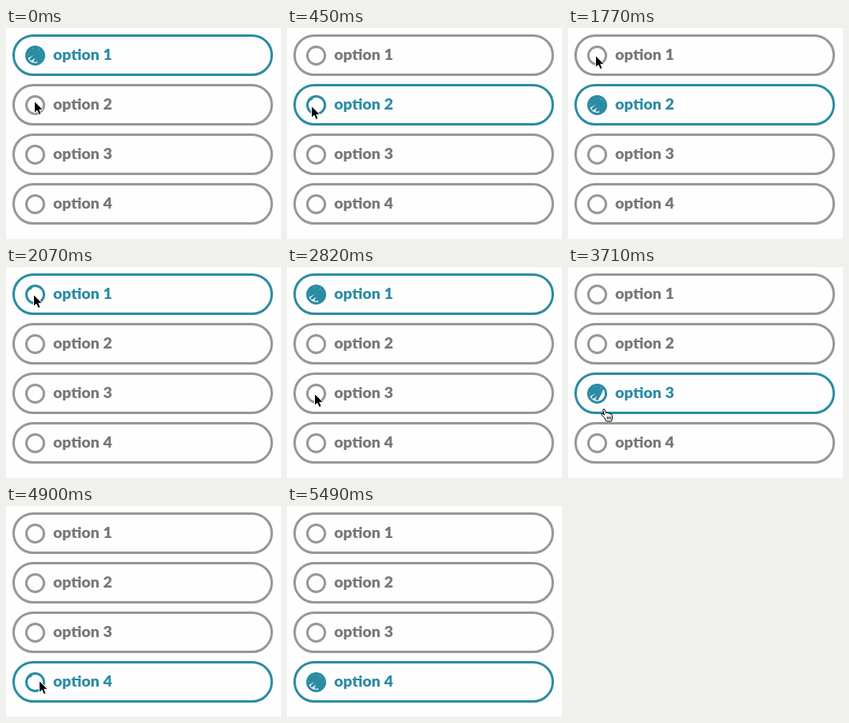
An HTML page that plays this animation: 344x264 px, repeating every 5.93 s.

```html
<!DOCTYPE html>
<html lang="en">
<head>
<meta charset="utf-8">
<title>Scribbled radio buttons</title>
<style>
  html, body { margin: 0; width: 100%; height: 100%; overflow: hidden; background: #fefefe; }
  svg { display: block; width: 344px; height: 264px; }
  .option { color: #979797; --text: #777; }
  .option.on { color: #2b8ca3; --text: #2b8ca3; }
  .pill, .ring { fill: none; stroke: currentColor; stroke-width: 3; }
  .scribble { fill: none; stroke: currentColor; stroke-width: 13; stroke-linecap: round; stroke-linejoin: round; visibility: hidden; }
  .on .scribble { visibility: visible; }
  text { font: 900 19.5px Lato, "Open Sans", sans-serif; fill: var(--text); }
</style>
</head>
<body>
<svg id="stage" viewBox="0 0 344 264">
  <g id="options"></g>
  <g id="cursor">
    <path id="arrow" d="M.5 .5V15.5L4 12.3 6.2 17.5 9 16.4 6.8 11.3H11.4Z" fill="#000" stroke="#fff"/>
    <path id="hand" d="M4.5 11.5L1 8.2Q-.2 6.4 2 6.3L4.6 8.2 2.7 2.4Q2.6 .4 4.5 .8L6.7 6Q7 4.6 8.8 5.2L9.2 6.4Q10 5.2 11.6 6.1L11.9 7.2Q14 6.6 14.3 8.6L14.5 12 13.3 16H6.8ZM8.2 10.2V13.6M10.2 10.2V13.6M12.2 10.2V13.6" fill="#fff" stroke="#000" stroke-linejoin="round"/>
  </g>
</svg>
<script>
const LOOP = 5930;
const SCRIBBLE = 'M16 24Q23 20 29 15Q20 24 12.5 38Q38 28 49.5 11.5Q42 28 14 56Q42 43 63 16Q58 42 29 69' +
  'Q65 45 74.5 26Q67 52 48.5 77Q72 64 84 37Q80 60 66 81Q78 76 84 57';

// [time, selected option]
const SELECTIONS = [[-2000, 0], [450, 1], [2070, 0], [3260, 2], [4900, 3]];

// [time since selection, drawn share of the scribble]
const DRAWING = [[0, .04], [140, .2], [290, .5], [440, .75], [590, 1]];

// [time, x, y, shape]
const MOVES = [
  [0, 35, 91, 'arrow'], [150, 30, 97, 'arrow'],
  [1340, 29, 86, 'arrow'], [1490, 29, 66, 'arrow'], [1630, 32, 45, 'arrow'], [1770, 34, 34, 'arrow'],
  [2520, 34, 66, 'arrow'], [2670, 34, 118, 'arrow'], [2820, 34, 158, 'arrow'],
  [3560, 38, 166, 'arrow'], [3710, 41, 177, 'hand'], [3860, 43, 190, 'arrow'],
  [4010, 43, 208, 'arrow'], [4160, 42, 219, 'arrow'], [4310, 41, 218, 'arrow'],
  [5190, 41, 222, 'arrow'], [5340, 41, 235, 'arrow'], [5490, 0, 0, 'none']
];

const byId = id => document.getElementById(id);
const latest = (table, time) => table.findLast(row => row[0] <= time);

byId('options').innerHTML = [0, 1, 2, 3].map(i => `
  <g class="option" transform="translate(0 ${i * 62})">
    <rect class="pill" x="9.5" y="9.5" width="323" height="49" rx="24.5"/>
    <circle class="ring" cx="36.5" cy="34.5" r="11"/>
    <path class="scribble" d="${SCRIBBLE}" pathLength="1" transform="translate(24 22) scale(.25)"/>
    <text x="59" y="40">option ${i + 1}</text>
  </g>`).join('');

const options = [...document.querySelectorAll('.option')];
const scribbles = [...document.querySelectorAll('.scribble')];

function render(time) {
  const [start, selected] = latest(SELECTIONS, time);
  const [, drawn] = latest(DRAWING, time - start);
  options.forEach((option, i) => option.classList.toggle('on', i === selected));
  scribbles[selected].setAttribute('stroke-dasharray', drawn < 1 ? `${drawn} 2` : 'none');

  const [, x, y, shape] = latest(MOVES, time);
  byId('cursor').setAttribute('transform', `translate(${x} ${y})`);
  for (const id of ['arrow', 'hand']) byId(id).style.display = id === shape ? '' : 'none';
}

const begin = performance.now();
function tick() {
  render((performance.now() - begin) % LOOP);
  requestAnimationFrame(tick);
}
tick();
</script>
</body>
</html>
```
